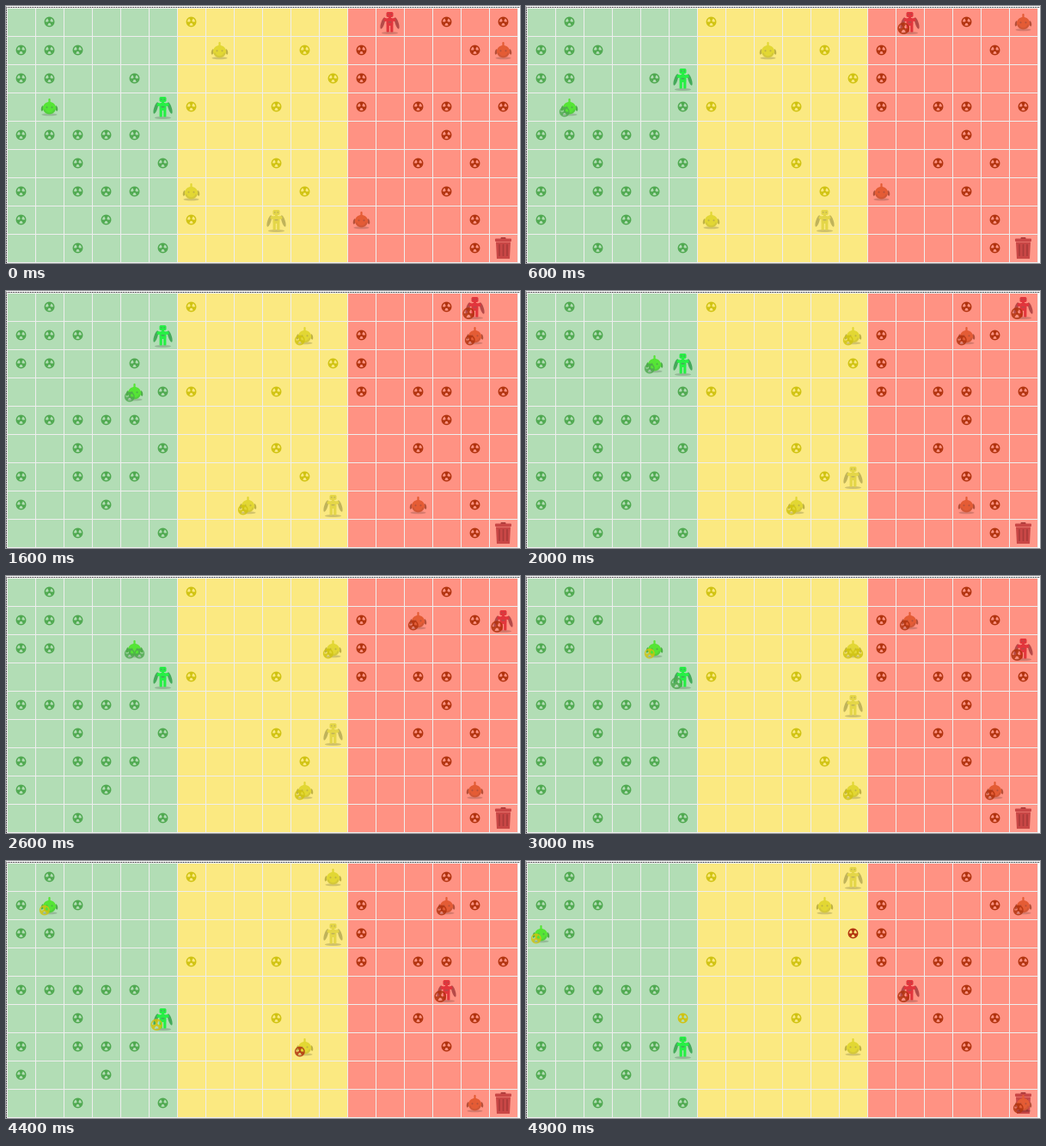
A matplotlib script for the animation above (5000 ms loop, 598 by 300 pixels).

```python
import matplotlib.pyplot as plt
from matplotlib.animation import FuncAnimation
from matplotlib.patches import Circle, Ellipse, FancyBboxPatch, Polygon, Rectangle, Wedge

W, H, CELL = 598, 300, 33
FRAMES, INTERVAL = 50, 100
FIRST, PERIOD = 1.07, 3.65   # model clock, in frames

ZONE = ["#b2ddb5", "#fbe981", "#ff9283"]
WASTE = ["#4fa950", "#d0c311", "#b1330e"]
ROUND = ["#55e535", "#e2d733", "#e45c35"]
ROUND_DARK = ["#4fae4a", "#bfb245", "#b5503a"]
WINGED = ["#27ef45", "#e4d648", "#e2353c"]
WING = ["#45a95a", "#c0b35a", "#b54a48"]

# o waste, r round robot, w winged robot; capitals stand on waste
BOARD = """
.o.... o..... .W.o.o
ooo... .r..o. o...or
oo..o. .....o o.....
.R...W o..o.. o.oo.o
ooooo. ...... ...o..
..o..o ...o.. ..o.o.
o.ooo. r...o. ...o..
o..o.. o..w.. r...o.
..o..o ...... ....o.
""".replace(" ", "").split()
ROWS, COLS = len(BOARD), len(BOARD[0])
BIN = (COLS - 1, ROWS - 1)

# One plan per robot in reading order:
# U/D/L/R move, P pick up, T transform, X drop, . wait
PLANS = """
PRRRRDDDDLLLL RRRPRDPTXUULD UPDLLLLLRRRRR PRRRUPTULLLDL
UUUDDDPDDPTXD DPRRRRRLUPTRX RDRUUUUU..UUU UDRRRRPRDXLPR
""".split()
MOVES = {"U": (0, -1), "D": (0, 1), "L": (-1, 0), "R": (1, 0)}


def simulate(steps):
    """Return the waste map and the robots after some steps."""
    tiles = {(c, r): ch for r, row in enumerate(BOARD)
             for c, ch in enumerate(row)}
    waste = {cell: cell[0] // 6 for cell, ch in tiles.items() if ch in "oRW"}
    crew = [{"kind": ch.lower(), "zone": cell[0] // 6, "cell": cell, "load": []}
            for cell, ch in tiles.items() if ch.lower() in "rw"]
    for s in range(steps):
        for bot, plan in zip(crew, PLANS):
            act, cell, load = plan[s], bot["cell"], bot["load"]
            if act in MOVES:
                dx, dy = MOVES[act]
                bot["cell"] = (cell[0] + dx, cell[1] + dy)
            elif act == "P":
                load.append(waste.pop(cell))
            elif act == "T":
                load[:] = [bot["zone"] + 1]
            elif act == "X":
                item = load.pop()
                if cell != BIN:
                    waste[cell] = item
    return waste, crew


fig = plt.figure(figsize=(W / 100, H / 100), dpi=100, facecolor="white")
ax = fig.add_axes([0, 0, 1, 1])
ax.set_xlim(0, W)
ax.set_ylim(H, 0)
ax.axis("off")


def center(cell):
    return 17.5 + CELL * cell[0], 18.5 + CELL * cell[1]


def put(patch, color, alpha=1, **kw):
    patch.set(facecolor=color, edgecolor="none", linewidth=0, alpha=alpha, **kw)
    return ax.add_patch(patch)


def box(x, y, w, h, r, color):
    """Rounded box centred on x with its top at y."""
    style = f"round,pad=0,rounding_size={r}"
    return put(FancyBboxPatch((x - w / 2, y), w, h, boxstyle=style), color)


def oval(x, y, w, h, color, alpha=1, angle=0):
    return put(Ellipse((x, y), w, h, angle=angle), color, alpha)


def draw_waste(x, y, zone, r=5.9, alpha=1):
    """Disc with three see-through blades."""
    ring = Wedge((x, y), r, 0, 360, width=r * 0.24)
    parts = [put(ring, WASTE[zone], alpha),
             put(Circle((x, y), r * 0.25), WASTE[zone], alpha)]
    for a in (0, 120, 240):
        parts.append(put(Wedge((x, y), r * 0.8, a, a + 60), WASTE[zone], alpha))
    return parts


def draw_round(x, y, zone):
    body, dark = ROUND[zone], ROUND_DARK[zone]
    parts = [oval(x, y + 9.3, 18, 3, "black", 0.16)]
    parts += [oval(x + s * 8.2, y + 2, 2.8, 6.5, dark, angle=-12 * s)
              for s in (-1, 1)]
    parts += [box(x, y - 9.5, 2.2, 5, 1, body),
              oval(x, y + 1.6, 15, 14.4, body),
              put(Wedge((x, y + 1.6), 7.2, 15, 165, width=2), dark, 0.4)]
    parts += [oval(x + s * 3, y + 0.8, 2, 2, dark) for s in (-1, 1)]
    return parts


def draw_winged(x, y, zone):
    body, wing = WINGED[zone], WING[zone]
    parts = [oval(x, y + 13, 19, 3, "black", 0.17)]
    for s in (-1, 1):
        parts += [oval(x + s * 8.2, y + 1.5, 4, 14, wing, angle=-18 * s),
                  oval(x + s * 5, y - 2.5, 4, 4, body),
                  box(x + s * 2.3, y + 3, 3.2, 9, 1, body)]
    parts += [box(x, y - 11.5, 8, 6, 1.8, body),
              box(x, y - 6, 3, 3, 0.5, body),
              box(x, y - 4.5, 8, 9, 2, body),
              box(x, y - 0.5, 4, 1.5, 0.5, wing)]
    parts += [oval(x + s * 1.8, y - 8.6, 1.7, 1.7, wing) for s in (-1, 1)]
    return parts


def draw_robot(bot):
    x, y = center(bot["cell"])
    if bot["kind"] == "r":
        parts, off, r = draw_round(x, y, bot["zone"]), 5.7, 5.9
    else:
        parts, off, r = draw_winged(x, y, bot["zone"]), 7.3, 6.8
    for side, item in zip((-1, 1), bot["load"]):
        parts += draw_waste(x + side * off, y + off + 0.3, item, r, 0.85)
    return parts


def draw_bin():
    x, y = center(BIN)
    red, dark = "#c94746", "#a83a39"
    put(Rectangle((x - 16, y - 16), 32, 32), "white", 0.07)
    box(x, y - 12.5, 6, 3, 1, dark)
    box(x, y - 11, 19, 3.5, 1, red)
    put(Polygon([(x - 8.5, y - 7), (x + 8.5, y - 7),
                 (x + 7.5, y + 12.5), (x - 7.5, y + 12.5)]), red)
    for s in (-1, 0, 1):
        box(x + 4.5 * s, y - 4.5, 1.6, 14, 0.5, dark)


def draw_board():
    right, bottom = COLS * CELL, ROWS * CELL
    for z, color in enumerate(ZONE):
        put(Rectangle((1 + z * right / 3, 2), right / 3, bottom), color,
            antialiased=False)
    draw_bin()
    for k in range(COLS + 1):
        put(Rectangle((1 + CELL * k, 2), 1, bottom + 1), "#eeeeee",
            antialiased=False)
    for k in range(ROWS + 1):
        put(Rectangle((1, 2 + CELL * k), right + 1, 1), "#eeeeee",
            antialiased=False)
    for xs, ys in (((0, W), (1.5, 1.5)), ((0.5, 0.5), (1, H))):
        ax.plot(xs, ys, color="black", lw=0.72, ls=(0, (1, 1)), snap=False)


draw_board()
sprites = []


def update(frame):
    while sprites:
        sprites.pop().remove()
    waste, crew = simulate(max(0, int((frame - FIRST) / PERIOD)))
    taken = {bot["cell"] for bot in crew}
    for cell, zone in waste.items():
        if cell not in taken:
            sprites.extend(draw_waste(*center(cell), zone))
    for bot in crew:
        sprites.extend(draw_robot(bot))
    return sprites


anim = FuncAnimation(fig, update, frames=FRAMES, interval=INTERVAL,
                     init_func=lambda: [], repeat=True, repeat_delay=0,
                     blit=False)
plt.show()
```
